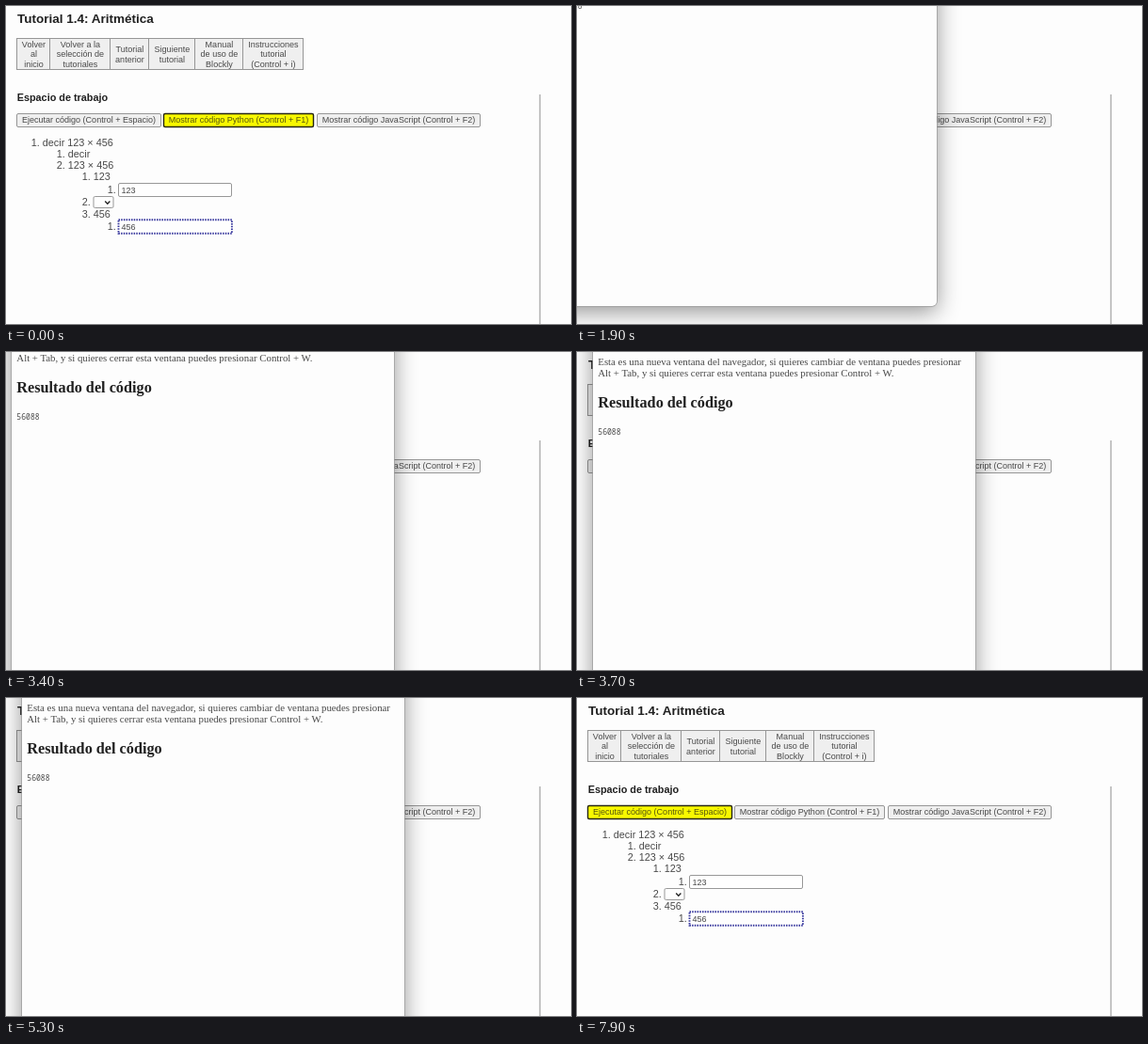
An HTML page for the animation above (8000 ms loop, 600 px wide and 338 px high).

```html
<!DOCTYPE html>
<html lang="es">
<head>
<meta charset="utf-8">
<title>Tutorial 1.4: Aritmética</title>
<style>
  html, body { margin: 0; width: 100%; height: 100%; overflow: hidden; background: #fdfdfd; }
  #stage { position: relative; width: 100%; height: 100%; overflow: hidden; contain: strict; }
  svg { position: absolute; left: 0; top: 0; }
  text { font: 9.02px "Liberation Sans", Arial, sans-serif; fill: #484848; }
  text.title { font-size: 13.5px; font-weight: bold; fill: #202020; }
  text.sub { font-size: 10.85px; font-weight: bold; fill: #202020; }
  text.item { font-size: 10.85px; }
  text.mid { text-anchor: middle; }
  .btn { fill: #efefef; stroke: #969696; }
  .btn.on { fill: #f8f800; stroke: #262610; stroke-width: 1.4; }
  .btn.on + text { fill: #55550c; }
  .field { fill: #fefefe; stroke: #989898; }
  #popup {
    position: absolute; left: 17px; top: -70px; width: 406px; height: 474px;
    background: #fdfdfd; border-radius: 0 0 5px 5px;
    box-shadow: 0 0 0 .7px #999, 0 6px 24px rgba(0, 0, 0, .42);
  }
  #popup svg { left: -17px; top: 70px; }
  #popup text { font: 10.82px "Liberation Serif", "Times New Roman", serif; }
  #popup text.head { font-size: 16.24px; font-weight: bold; fill: #202020; }
  #popup text.code { font: 8.1px "Noto Sans Mono", monospace; }
</style>
</head>
<body>
<div id="stage">
  <svg id="page" width="600" height="338"></svg>
  <div id="popup"><svg id="result" width="600" height="338"></svg></div>
</div>
<script>
const $ = id => document.getElementById(id);
const text = (x, y, s, cls = '') => `<text x="${x}" y="${y}" class="${cls}">${s}</text>`;
const box = (x, y, w, h, cls, r = 0) =>
  `<rect x="${x}" y="${y}" width="${w}" height="${h}" rx="${r}" class="${cls}"/>`;

// Navigation: left edge, right edge, lines of the label
const nav = [
  [12, 47, 'Volver|al|inicio'],
  [47, 111, 'Volver a la|selección de|tutoriales'],
  [111, 152, 'Tutorial|anterior'],
  [152, 201, 'Siguiente|tutorial'],
  [201, 252, 'Manual|de uso de|Blockly'],
  [252, 316, 'Instrucciones|tutorial|(Control + i)']
].map(([a, b, label]) => {
  const lines = label.split('|');
  const top = 54.4 - (lines.length - 1) * 5.15;
  return box(a - .5, 34.5, b - a, 33, 'btn') +
    lines.map((s, i) => text((a + b) / 2 - .1, top + i * 10.3, s, 'mid')).join('');
}).join('');

const actions = [
  [11.5, 153, 'Ejecutar código (Control + Espacio)'],
  [167.5, 159, 'Mostrar código Python (Control + F1)'],
  [330.5, 173, 'Mostrar código JavaScript (Control + F2)']
].map(([x, w, s]) =>
  box(x, 114.5, w, 14, 'btn action', 1.5) + text(x + w / 2, 124.4, s, 'mid')).join('');

// Block tree: depth, baseline, label
const tree = [
  [0, 148.8, '1. decir 123 × 456'],
  [1, 161, '1. decir'],
  [1, 173.2, '2. 123 × 456'],
  [2, 185.4, '1. 123'],
  [3, 198.5, '1.'],
  [2, 212.3, '2.'],
  [2, 224.6, '3. 456'],
  [3, 237.8, '1.']
].map(([depth, y, s]) => text(26.7 + depth * 27, y, s, 'item')).join('');

$('page').innerHTML =
  text(12, 17.5, 'Tutorial 1.4: Aritmética', 'title') + nav +
  text(11.7, 101, 'Espacio de trabajo', 'sub') + actions + tree +
  box(119.5, 188.5, 120, 14, 'field', 1.5) + text(122.5, 198.6, '123') +
  box(93, 202.5, 21, 12, 'field', 1.5) +
  '<path d="M105.2 207.6l2.6 2.6 2.6-2.6" fill="none" stroke="#222" stroke-width="1.4"/>' +
  '<rect x="119.5" y="227.3" width="120.4" height="14.4" fill="#fefefe" stroke="#34349c" ' +
  'stroke-width="1.9" stroke-dasharray="1.5 1.2"/>' + text(122.5, 237.6, '456') +
  '<path d="M567 94V338" stroke="#a8a8a8" stroke-width="1.3"/>';

$('result').innerHTML =
  text(22.3, 13.7, 'Esta es una nueva ventana del navegador, si quieres cambiar de ventana puedes presionar') +
  text(22.3, 26, 'Alt + Tab, y si quieres cerrar esta ventana puedes presionar Control + W.') +
  text(22.3, 59.4, 'Resultado del código', 'head') +
  text(22.3, 88, '56088', 'code');

const [run, python] = document.querySelectorAll('.action');
const popup = $('popup');
const clamp = v => Math.min(1, Math.max(0, v));

// Window drag: time, x and y offset from the resting place
const drag = [[2500, -41, -85], [2800, -33, -66], [3400, -11, -16], [3700, 0, 0]];

function offset(t) {
  const i = drag.findIndex(p => p[0] > t);
  if (i < 0) return [0, 0];
  if (!i) return drag[0].slice(1);
  const [a, b] = [drag[i - 1], drag[i]];
  const k = (t - a[0]) / (b[0] - a[0]);
  return [1, 2].map(n => a[n] + (b[n] - a[n]) * k);
}

function draw(t) {
  // The page loses its focus highlight while the window is open
  python.classList.toggle('on', t < 100);
  run.classList.toggle('on', t >= 100 && (t < 1700 || t >= 7100));
  const [x, y] = offset(t);
  popup.style.transform = `translate(${x}px, ${y}px)`;
  popup.style.opacity = clamp((t - 1650) / 150) * clamp((7180 - t) / 130);
}

const start = performance.now();
function tick() {
  draw((performance.now() - start) % 8000);
  requestAnimationFrame(tick);
}
draw(0);
requestAnimationFrame(tick);
</script>
</body>
</html>
```
